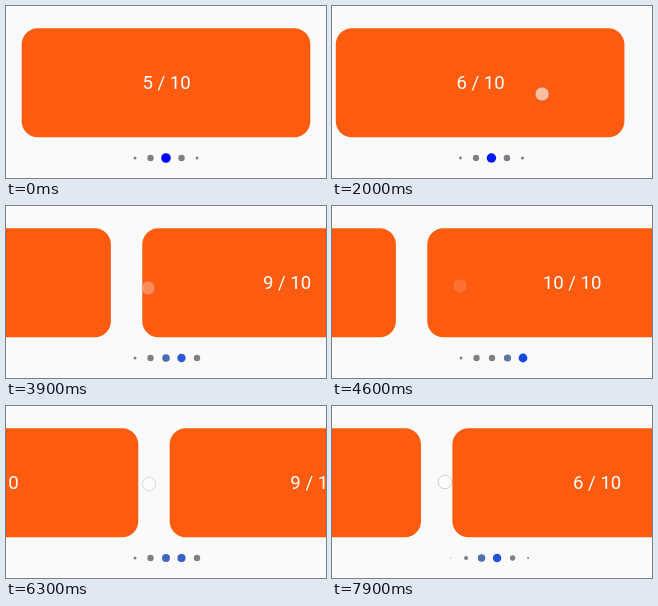
Animation of 320 by 172 pixels, one loop 8 s. Source, as an HTML page:

```html
<!DOCTYPE html>
<html lang="en">
<head>
<meta charset="utf-8">
<title>Pager with dot indicator</title>
<style>
  html, body { margin: 0; width: 100%; height: 100%; overflow: hidden; background: #fafafa; }
  svg { display: block; width: 320px; height: 172px; }
  .card rect { fill: #fd5b10; }
  .card text { font: 18.6px Roboto, Arial, sans-serif; fill: #fff; text-anchor: middle; }
  #touch { fill: rgba(255, 255, 255, .6); stroke: rgba(130, 130, 130, .5); stroke-width: .8; }
</style>
</head>
<body>
<svg viewBox="0 0 320 172">
  <g id="pages"></g>
  <g id="dots"></g>
  <circle id="touch" r="6.8"/>
</svg>
<script>
const LOOP = 8000, PAGE = 320, COUNT = 10, GAP = 15.5;
const SLOP = 8, PRESS = 60, SETTLE = 350, FADE = 130;

// from, to: pages; at: drag start in ms; x, y: where the finger lands
const forward = { drag: 160, px: 99 };
const back = { drag: 130, px: 70 };
const swipes = [
  { from: 5, to: 6, at: 800, x: 240, y: 86, ...forward },
  { from: 6, to: 7, at: 1962, x: 230, y: 88, ...forward },
  { from: 7, to: 8, at: 3030, x: 251, y: 82, ...forward },
  { from: 8, to: 9, at: 3677, x: 249, y: 82, ...forward },
  { from: 9, to: 10, at: 4340, x: 235, y: 80, ...forward },
  { from: 10, to: 10, at: 5130, x: 196, y: 78, ...forward },
  { from: 10, to: 9, at: 5590, x: 60, y: 78, ...back },
  { from: 9, to: 8, at: 6130, x: 65, y: 78, ...back },
  { from: 8, to: 7, at: 6670, x: 55, y: 77, ...back },
  { from: 7, to: 6, at: 7210, x: 45, y: 77, ...back },
  { from: 6, to: 5, at: 7754, x: 35, y: 76, ...back }
];

const $ = id => document.getElementById(id);
const clamp = (v, lo = 0, hi = 1) => Math.min(hi, Math.max(lo, v));
const mix = (a, b, k) => a + (b - a) * k;

function add(parent, tag, attrs, text = '') {
  const el = document.createElementNS('http://www.w3.org/2000/svg', tag);
  set(el, attrs);
  el.textContent = text;
  return parent.appendChild(el);
}
function set(el, attrs) {
  for (const name in attrs) el.setAttribute(name, attrs[name]);
}

const cards = [], dots = [];
for (let i = 1; i <= COUNT; i++) {
  const card = add($('pages'), 'g', { class: 'card' });
  add(card, 'rect', { x: 15.7, y: 22.3, width: 288.6, height: 109, rx: 16 });
  add(card, 'text', { x: 160.5, y: 83.2 }, `${i} / ${COUNT}`);
  cards.push(card);
  dots.push(add($('dots'), 'circle', { cy: 152 }));
}

const dragged = (s, t) => s.px * clamp((t - s.at) / s.drag) ** 1.5;

function pagerAt(t) {
  let pos = swipes[0].from, stretch = 0;
  for (const s of swipes) {
    if (t < s.at) break;
    const released = t - s.at - s.drag;
    if (s.from === s.to) {
      stretch = .04 * dragged(s, t) / s.px * Math.exp(-Math.max(0, released) / 98);
      continue;
    }
    stretch = 0;
    const pulled = dragged(s, t) / PAGE;
    const fling = 1 - (1 - clamp(released / SETTLE)) ** 3;
    pos = mix(s.from, s.to, mix(pulled, 1, fling));
  }
  return { pos, stretch };
}

function drawPages(pos, stretch) {
  const k = 1 + stretch;
  set($('pages'), { transform: `translate(${PAGE * (1 - k)} 0) scale(${k} 1)` });
  cards.forEach((card, n) => {
    const x = (n + 1 - pos) * PAGE;
    set(card, { transform: `translate(${x} 0)`, visibility: Math.abs(x) < PAGE ? 'visible' : 'hidden' });
  });
}

function drawDots(pos) {
  const center = clamp(pos, 3, COUNT - 2);
  dots.forEach((dot, n) => {
    const off = n + 1 - center, far = Math.abs(off);
    let r = far < 1 ? 3.2 : far < 2 ? mix(3.2, 1.5, far - 1) : Math.max(0, 1.5 * (3 - far));
    // the last dots keep full size once the row stops scrolling
    if (off > 1) r = mix(r, 3.2, clamp(center - COUNT + 3));
    const on = clamp(1 - Math.abs(n + 1 - pos));
    set(dot, { cx: 160 + off * GAP, r: mix(r, 4.8, on) });
    dot.style.fill = `color-mix(in oklab, #00f ${on * 100}%, #808080)`;
  });
}

function drawTouch(t) {
  const s = swipes.find(s => t >= s.at - PRESS && t < s.at + s.drag + FADE);
  if (!s) return set($('touch'), { opacity: 0 });
  const dir = s.px === back.px ? 1 : -1;
  const press = clamp((t - s.at + PRESS) / PRESS);
  const fade = 1 - clamp((t - s.at - s.drag) / FADE);
  set($('touch'), {
    cx: s.x + dir * (SLOP * press ** 2 + dragged(s, t)),
    cy: s.y,
    opacity: Math.min(1, press * 3) * fade
  });
}

function frame() {
  const t = performance.now() % LOOP;
  const { pos, stretch } = pagerAt(t);
  drawPages(pos, stretch);
  drawDots(pos);
  drawTouch(t);
  requestAnimationFrame(frame);
}
frame();
</script>
</body>
</html>
```
